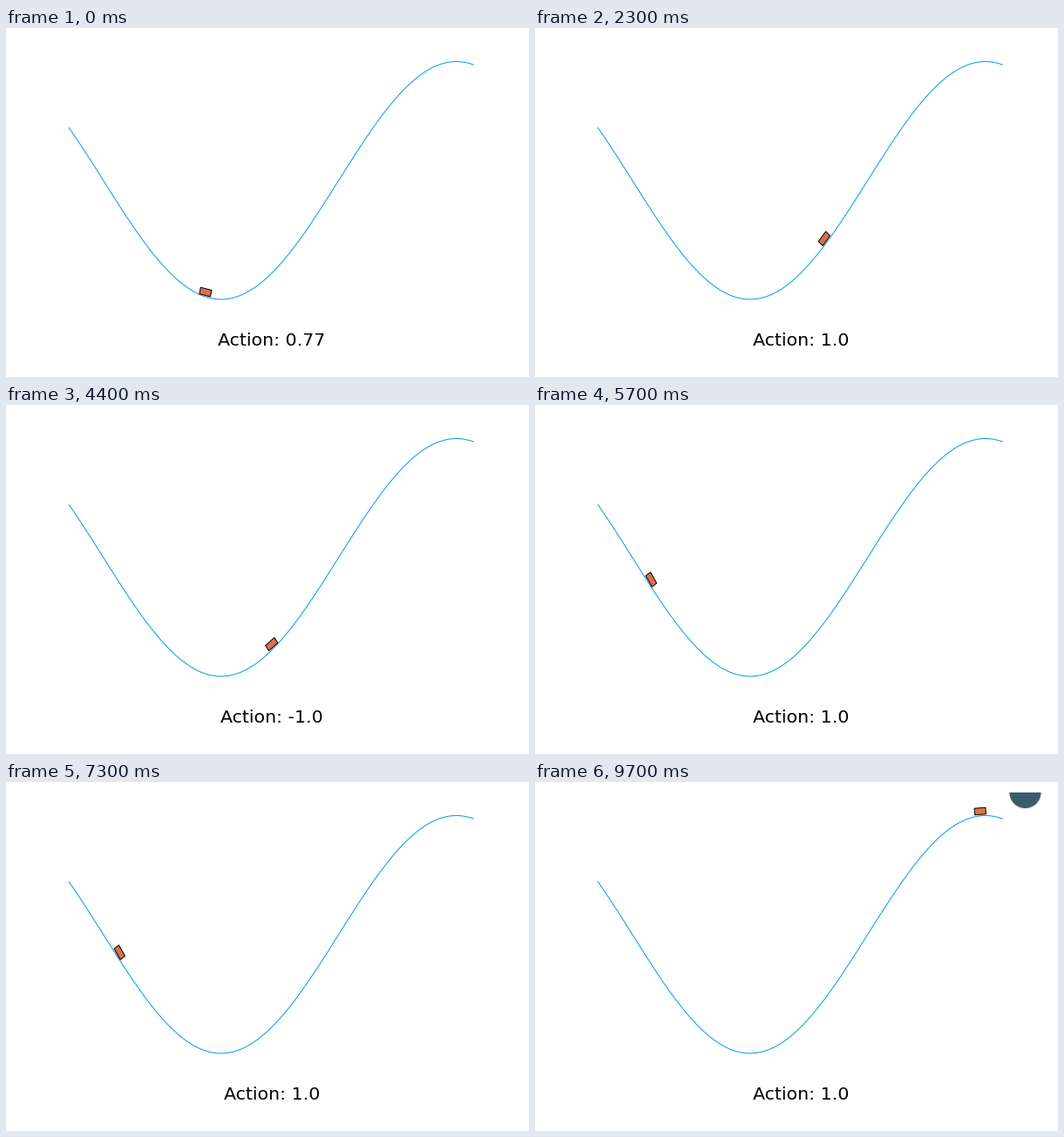
These frames come from a looping animation (600 by 400 pixels, 9800 ms). A matplotlib script:

```python
import math
import numpy as np
import matplotlib.pyplot as plt
from matplotlib.animation import FuncAnimation
from matplotlib.patches import Polygon, Wedge

W, H, DPI = 600, 400, 100
FRAMES, INTERVAL = 98, 100
PX = 72 / DPI                      # points per pixel

# data-to-pixel mapping
LEFT, X_SCALE = 72.3, 257.8
MID, Y_SCALE = 174.75, 302.8
MIN_POS, MAX_POS, GOAL = -1.2, 0.6, 0.5

POWER, GRAVITY, MAX_SPEED = 0.0015, 0.0025, 0.07
CAR_W, CAR_H, CLEARANCE = 0.05, 0.025, 0.005

# full throttle one way per phase, with a few softer steps
SOFT_STEPS = {0: 0.77, 1: 0.91, 28: 0.45, 29: -1.0, 30: 1.0, 56: -0.52,
              58: -1.0, 63: -0.64, 80: 0.98}


def action(i):
    return SOFT_STEPS.get(i, -1.0 if 31 <= i < 57 else 1.0)


def height(x):
    return 0.45 * np.sin(3 * x) + 0.55


def drive():
    x, v = -0.5965, 0.0017
    path = [x]
    for i in range(1, FRAMES):
        v += POWER * action(i) - GRAVITY * math.cos(3 * x)
        v = max(-MAX_SPEED, min(MAX_SPEED, v))
        x = max(MIN_POS, min(MAX_POS, x + v))
        if x == MIN_POS:
            v = max(v, 0.0)
        path.append(x)
    return path


def car_corners(x):
    t = math.cos(3 * x)
    c, s = math.cos(t), math.sin(t)
    low, high, half = CLEARANCE, CLEARANCE + CAR_H, CAR_W / 2
    box = [(-half, low), (-half, high), (half, high), (half, low)]
    return [(x + a * c - b * s, height(x) + a * s + b * c) for a, b in box]


def make_axes(fig):
    ax = fig.add_axes([0, 0, 1, 1])
    ax.axis("off")
    return ax


fig = plt.figure(figsize=(W / DPI, H / DPI), dpi=DPI, facecolor="white")

world = make_axes(fig)
world.set_xlim(MIN_POS - LEFT / X_SCALE, MIN_POS + (W - LEFT) / X_SCALE)
world.set_ylim(0.55 + (MID - H) / Y_SCALE, 0.55 + MID / Y_SCALE)

screen = make_axes(fig)
screen.set_xlim(0, W)
screen.set_ylim(H, 0)

xs = np.linspace(MIN_POS, MAX_POS, 100)
world.plot(xs, height(xs), color="#009AF9", lw=PX)

positions = drive()
car = Polygon(car_corners(positions[0]), closed=True, facecolor="#E26F46",
              edgecolor="black", lw=PX, joinstyle="miter", zorder=3)
world.add_patch(car)

label = screen.text(305, 364, "", ha="center", va="baseline", color="black",
                    family="DejaVu Sans", fontsize=20.5 * PX)

# half disc shown once the goal is reached
goal_mark = [Wedge((562.4, 12), r, 0, 180, facecolor=c, edgecolor="none")
             for r, c in ((19.3, "#E6E9EB"), (18, "#3B5B6D"))]
for part in goal_mark:
    screen.add_patch(part)


def draw(i):
    x = positions[i]
    car.set_xy(car_corners(x))
    label.set_text(f"Action: {action(i)}")
    for part in goal_mark:
        part.set_visible(x >= GOAL)
    return [car, label, *goal_mark]


# the y axis points down, so the discs are turned to hang below the edge
for part in goal_mark:
    part.set_theta1(0)
    part.set_theta2(180)

anim = FuncAnimation(fig, draw, frames=FRAMES, interval=INTERVAL,
                     repeat=True, repeat_delay=0)
plt.show()
```
